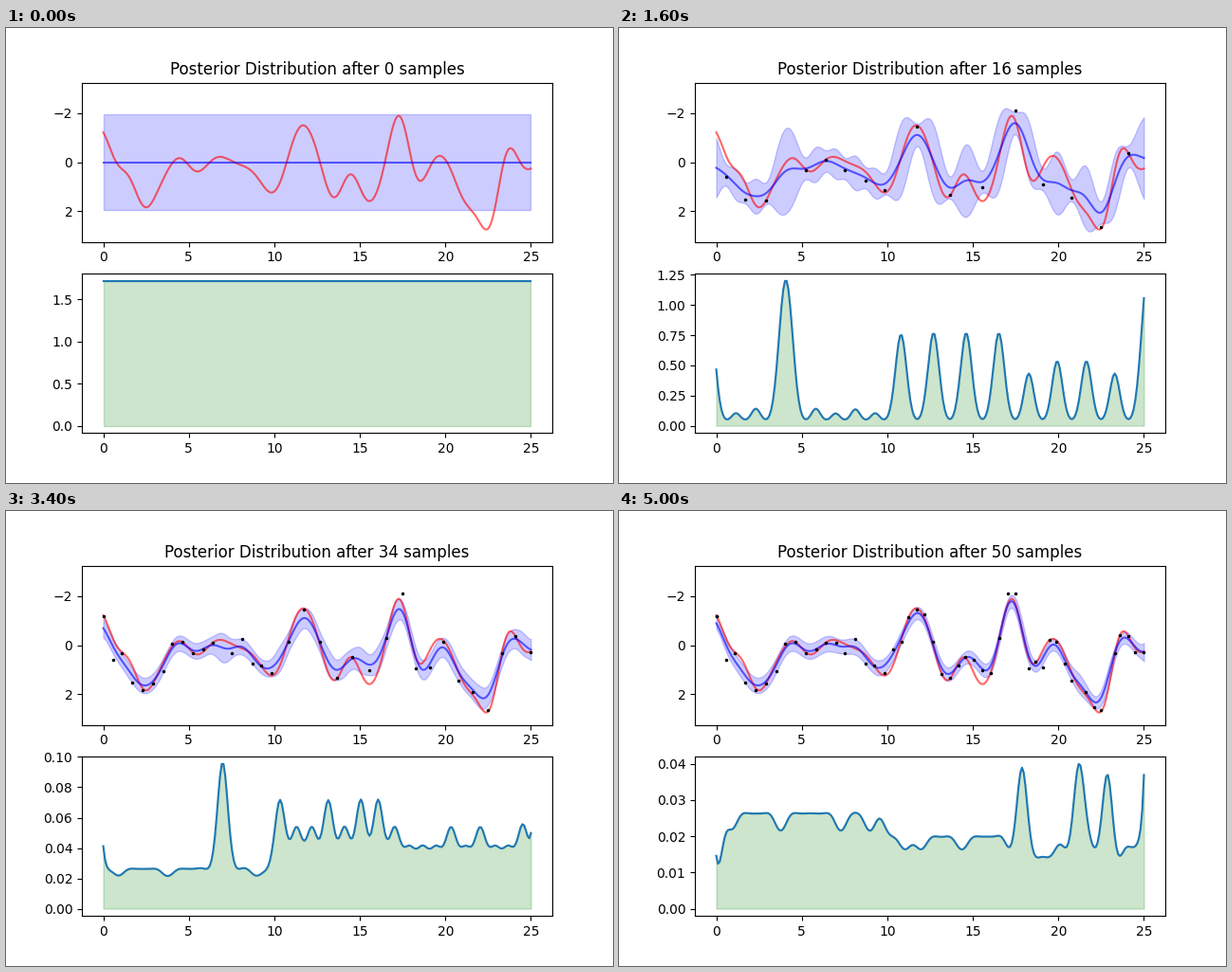
A matplotlib script that plays this animation: 640x480 px, repeating every 5.1 s.

```python
import numpy as np
import matplotlib.pyplot as plt
from matplotlib.animation import FuncAnimation

SAMPLES = 50
NOISE = 0.3
x = np.linspace(0, 25, 250)

# Evenly spaced heights of the true function; the process fills in the rest.
heights = np.array([
    -1.22, 0, .6, 1.73, 1.4, .31, -.16, .33, .12, -.22, -.03, .2,
    .7, 1.24, .27, -1.31, -1.17, .53, 1.39, .5, 1.27, 1.34, -.66,
    -1.8, .34, .42, -.26, .54, 1.7, 2.42, 2.36, -.2, -.17, .26])
knots = np.linspace(0, 25, len(heights))

# Positions where the measurement strays far from the truth, and how far.
strays = {.6: .83, 1.7: .67, 3.5: .38, 7.5: .38, 8.15: -.38, 8.75: .34,
          10.35: -.65, 15.3: -.55, 17.27: -.37, 18.3: .43, 19.1: .7,
          20.6: .32}

# Grid indices measured first, while most of the axis is still equally unknown.
first = [174, 98, 6, 240, 52, 136]


def kernel(a, b):
    return np.exp(-(a[:, None] - b[None, :]) ** 2)


def posterior(px, py, noise=NOISE):
    """Mean and spread of the Gaussian process on the grid x."""
    cross = kernel(px, x)
    weights = np.linalg.solve(kernel(px, px) + noise * np.eye(len(px)), cross)
    return weights.T @ py, 1 - (cross * weights).sum(axis=0)


def acquisition(spread):
    return np.exp(spread ** 2) - 1


def measure(truth):
    error = np.random.default_rng(1).normal(0, 0.08, len(x))
    for place, offset in strays.items():
        error[abs(x - place) < 0.27] = offset
    return truth + error


def sampling_order():
    """Always measure next where the acquisition is highest."""
    order = list(first)
    while len(order) < SAMPLES:
        spread = posterior(x[order], measured[order])[1]
        order.append(int(np.argmax(acquisition(spread))))
    return np.array(order)


truth = posterior(knots, heights, 1e-3)[0]
measured = measure(truth)
order = sampling_order()

fig, (top, bottom) = plt.subplots(2, 1, figsize=(6.4, 4.8), dpi=100)


def draw(n):
    px, py = x[order[:n]], measured[order[:n]]
    mean, spread = posterior(px, py)
    score = acquisition(spread)

    top.clear()
    top.set_title(f"Posterior Distribution after {n} samples")
    top.plot(x, truth, color="red", alpha=0.6)
    top.plot(x, mean, color="blue", alpha=0.6)
    top.fill_between(x, mean - 1.96 * spread, mean + 1.96 * spread,
                     color="blue", alpha=0.2)
    top.plot(px, py, "k.", markersize=3)
    top.set_ylim(3.25, -3.25)

    bottom.clear()
    bottom.plot(x, score)
    bottom.fill_between(x, 0, score, color="green", alpha=0.2)


anim = FuncAnimation(fig, draw, frames=SAMPLES + 1, interval=100,
                     init_func=lambda: None, repeat=True)
plt.show()
```
